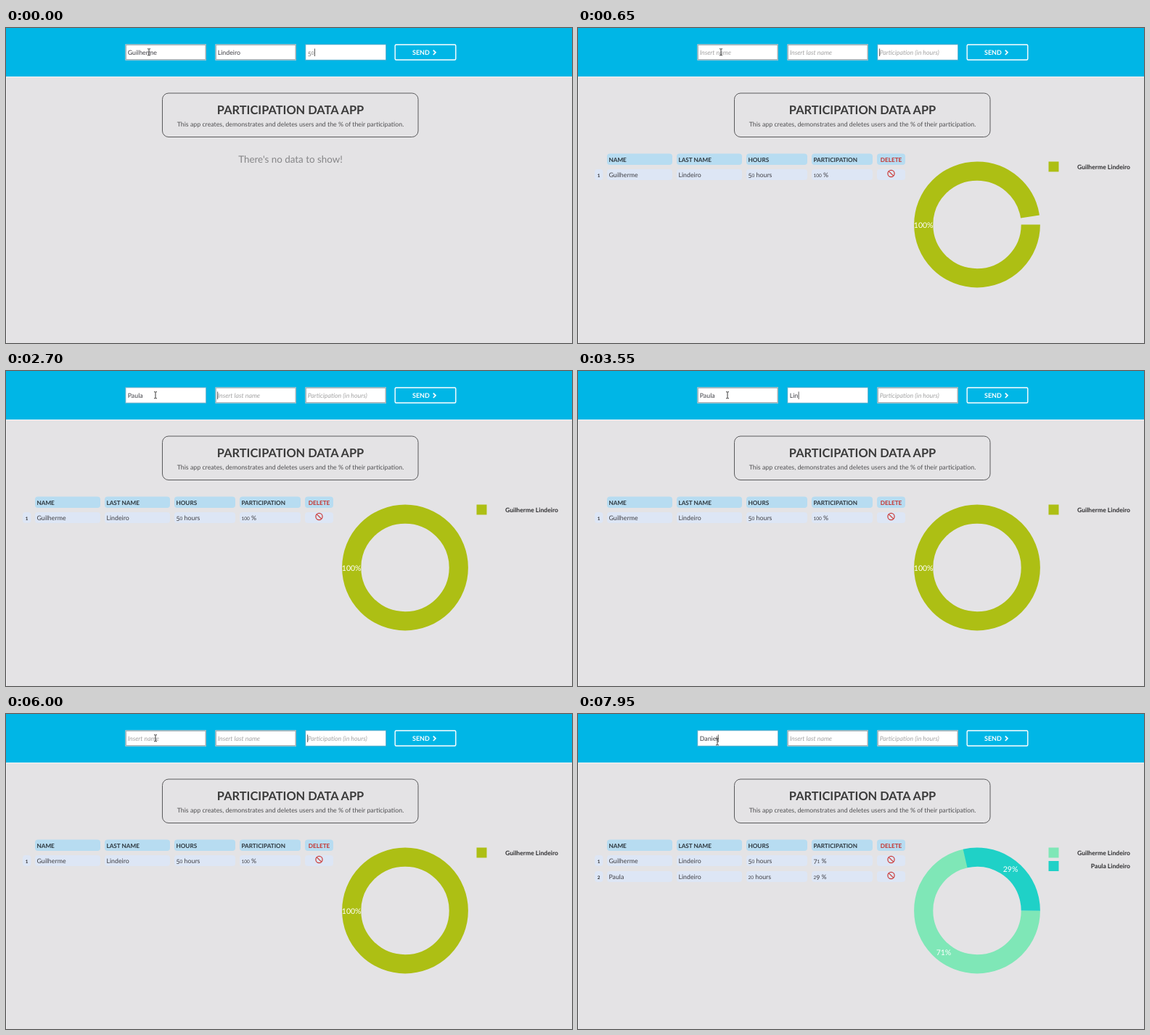
An HTML page that plays this animation: 780 px wide and 435 px high, repeating every 8000 ms.

```html
<!DOCTYPE html>
<html lang="en">
<head>
<meta charset="utf-8">
<title>Participation data app</title>
<style>
  html, body { margin: 0; width: 100%; height: 100%; overflow: hidden; background: #e4e3e5; }
  svg { display: block; width: 780px; height: 435px; }
  text { font: 8.8px Lato, "Open Sans", sans-serif; fill: #3e3e44; text-rendering: geometricPrecision; white-space: pre; }
  .title { font-size: 16.4px; font-weight: 700; fill: #3a3a3a; }
  .empty { font-size: 13.4px; fill: #858587; }
  .sub { fill: #505052; }
  .send { font-size: 9px; font-weight: 700; fill: #fff; }
  .head { font-size: 8.2px; font-weight: 700; fill: #2c353c; }
  .red { fill: #c5322d; }
  .bold { font-size: 8.6px; font-weight: 700; fill: #2e2e30; }
  .share { font-size: 10.5px; fill: #fff; }
  .hint { font-style: italic; fill: #a3a3a3; }
  .mid { text-anchor: middle; }
  .end { text-anchor: end; }
</style>
</head>
<body>
<svg id="stage" viewBox="0 0 780 435"></svg>
<script>
const LOOP = 8000;
const FIRST = "Guilherme", SECOND = "Paula", THIRD = "Daniel", FAMILY = "Lindeiro";
const TABLE_ONE = 200, TABLE_TWO = 6050;

const stage = document.getElementById("stage");
const el = id => document.getElementById(id);
const rect = (x, y, w, h, fill, extra = "") =>
  `<rect x="${x}" y="${y}" width="${w}" height="${h}" fill="${fill}" ${extra}/>`;
const label = (x, y, str, cls = "") => `<text x="${x}" y="${y}" class="${cls}">${str}</text>`;

// Digits with old-style heights: 0-2 small, the others hang below the line.
function oldStyle(str) {
  let low = 0;
  return [...str].map(c => {
    const drop = /[34579]/.test(c) ? 1.6 : 0;
    const dy = drop - low;
    low = drop;
    const size = /[012]/.test(c) ? ' font-size=".74em"' : "";
    return `<tspan dy="${dy}"${size}>${c}</tspan>`;
  }).join("");
}

// ---- timeline ----
const keys = (word, times) =>
  times.map((t, i) => [t, word.slice(0, Math.round((i + 1) * word.length / times.length))]);

const values = [
  [[0, FIRST], [100, ""], ...keys(SECOND, [1950, 2050, 2150, 2250, 2350]),
   [5900, ""], [7400, THIRD[0]], [7650, THIRD.slice(0, 2)], [7750, THIRD.slice(0, 3)],
   [7850, THIRD.slice(0, 5)], [7950, THIRD]],
  [[0, FAMILY], [100, ""], ...keys(FAMILY, [3100, 3350, 3550, 3750, 4000, 4250, 4350, 4450]), [5900, ""]],
  [[0, "50"], [100, ""], [5200, "2"], [5700, "20"], [5900, ""]]
];
const focus = [[0, 2], [1000, 0], [2600, 1], [4700, 2], [6900, 0]];
const moves = [[1000, 1500, 9, 0], [6850, 7350, -14, 5]];
const beats = [...values.flat(), ...focus].map(e => e[0]).concat(TABLE_ONE, TABLE_TWO);

const indexAt = (list, t) => list.reduce((n, e, i) => e[0] <= t ? i : n, 0);
const clamp = v => Math.max(0, Math.min(1, v));
const smooth = v => v * v * (3 - 2 * v);

// cubic-bezier(0, 0, .58, 1)
function easeOut(x) {
  let a = 0, b = 1;
  for (let i = 0; i < 24; i++) {
    const m = (a + b) / 2;
    if (1.74 * m * m - 0.74 * m * m * m < x) a = m; else b = m;
  }
  return smooth(b);
}

// ---- form ----
const hints = ["Insert name", "Insert last name", "Participation (in hours)"];
const fieldX = i => 164.5 + i * 124;

const field = i => {
  const x = fieldX(i);
  return rect(x, 22.5, 111.5, 22, "#fff") +
    rect(x + 0.75, 23.25, 110, 20.5, "none", `id="edge${i}" stroke="#a3b0b5" stroke-width="1.5"`) +
    rect(x + 0.25, 22.75, 111, 21.5, "none", `id="ring${i}" stroke="#2f9dc4" stroke-width=".9"`) +
    `<text id="hint${i}" class="hint" x="${x + 3.2}" y="37">${hints[i]}</text>
     <text id="value${i}" x="${x + 3.2}" y="37"${i === 2 ? ' style="fill:#777"' : ""}></text>`;
};

// ---- table and chart ----
const columns = [[40, 90, "NAME"], [136, 90, "LAST NAME"], [232, 84, "HOURS"], [322, 84, "PARTICIPATION"]];
const CX = 550, CY = 271.5, RADIUS = 73.8, TURN = 2 * Math.PI * RADIUS;

const header = columns.map(([x, w, name]) =>
  rect(x, 173.5, w, 15.5, "#b7dcf1", 'rx="4"') + label(x + 2.4, 184.5, name, "head")).join("") +
  rect(412, 173.5, 39, 15.5, "#b7dcf1", 'rx="4"') + label(431.5, 184.5, "DELETE", "head red mid");

function row(n, cells) {
  const y = 195 + n * 22;
  return rect(23, y, 11.5, 15, "#dde6f5", 'rx="4"') +
    label(28.7, y + 10.6, oldStyle(String(n + 1)), "bold mid") +
    columns.map(([x, w], i) =>
      rect(x, y, w, 15, "#dde6f5", 'rx="4"') + label(x + 2.4, y + 10.6, oldStyle(cells[i]))).join("") +
    rect(412, y, 39, 15, "#dde6f5", 'rx="4"') +
    `<g transform="translate(431.5 ${y + 6})" fill="none" stroke="#cb3a37" stroke-width="1.2">
      <circle r="4.6"/><path d="M-3.2-3.2 3.2 3.2"/></g>`;
}

function slice(from, part, color, id = "") {
  return `<circle ${id} cx="${CX}" cy="${CY}" r="${RADIUS}" fill="none" stroke="${color}" stroke-width="26.2"
    stroke-dasharray="${part * TURN} ${TURN}" transform="rotate(${from * 360} ${CX} ${CY})"/>`;
}

function share(from, part) {
  const a = (from + part / 2) * 2 * Math.PI;
  return label(CX + RADIUS * Math.cos(a), CY + RADIUS * Math.sin(a) + 4, Math.round(part * 100) + "%", "share mid");
}

const legend = (n, color, name) =>
  rect(648.5, 184.5 + n * 18.5, 14, 14, color) + label(761, 194.7 + n * 18.7, name, "bold end");

const OLIVE = "#adbf14", MINT = "#7fe7b7", TEAL = "#1fd1c7", PART = 5 / 7;
const people = [`${FIRST} ${FAMILY}`, `${SECOND} ${FAMILY}`];

const one = header + row(0, [FIRST, FAMILY, "50 hours", "100 %"]) +
  slice(0, 1, OLIVE, 'id="whole"') + share(0, 1) + legend(0, OLIVE, people[0]);

const two = header + row(0, [FIRST, FAMILY, "50 hours", "71 %"]) + row(1, [SECOND, FAMILY, "20 hours", "29 %"]) +
  slice(0, PART, MINT) + slice(PART, 1 - PART, TEAL) + share(0, PART) + share(PART, 1 - PART) +
  legend(0, MINT, people[0]) + legend(1, TEAL, people[1]);

stage.innerHTML =
  rect(0, 0, 780, 435, "#e4e3e5") + rect(0, 67, 1, 368, "#f0f0f1") +
  rect(0, 0, 780, 67, "#00b6e6") + rect(0, 67, 780, 1, "#f3f6f7") +
  [0, 1, 2].map(field).join("") +
  rect(536.2, 23, 83.6, 21, "none", 'rx="1.5" stroke="#fff" stroke-width="1.4"') +
  label(560, 37, "SEND", "send") +
  `<path d="M588.8 30.6 592 33.8 588.8 37" fill="none" stroke="#fff" stroke-width="1.7"/>` +
  rect(215.5, 90, 352.5, 60.5, "none", 'rx="8.5" stroke="#5a5a5c"') +
  label(392, 118.5, "PARTICIPATION DATA APP", "title mid") +
  label(392, 136.4, "This app creates, demonstrates and deletes users and the % of their participation.", "sub mid") +
  `<g id="none">${label(392, 186, "There's no data to show!", "empty mid")}</g>
   <g id="one">${one}</g><g id="two">${two}</g>
   <rect id="caret" y="28.5" width=".8" height="10.5" fill="#333"/>
   <path id="pointer" d="M-2-4.5H-.5L0-4 .5-4.5H2M0-4V4M-2 4.5H-.5L0 4 .5 4.5H2" fill="none" stroke="#222" stroke-width=".9"/>`;

const show = (id, on) => el(id).style.display = on ? "" : "none";

function draw(t) {
  const f = indexAt(focus, t);
  const active = focus[f][1];
  const before = f ? focus[f - 1][1] : active;
  const blend = f ? smooth(clamp((t - focus[f][0]) / 400)) : 1;

  values.forEach((list, i) => {
    const str = list[indexAt(list, t)][1];
    const box = el("value" + i);
    if (box.textContent !== str) box.innerHTML = oldStyle(str);
    show("hint" + i, !str);
    const lit = i === active ? blend : i === before ? 1 - blend : 0;
    el("edge" + i).setAttribute("opacity", 1 - lit);
    el("ring" + i).setAttribute("opacity", lit);
  });

  const last = Math.max(...beats.filter(b => b <= t));
  const text = el("value" + active);
  const width = text.textContent ? text.getComputedTextLength() + 0.4 : -0.4;
  el("caret").setAttribute("x", fieldX(active) + 3.2 + width);
  show("caret", (t - last) % 1000 < 500);

  let x = 197, y = 33.3;
  for (const [start, end, dx, dy] of moves) {
    const p = smooth(clamp((t - start) / (end - start)));
    x += dx * p;
    y += dy * p;
  }
  el("pointer").setAttribute("transform", `translate(${x} ${y})`);

  show("none", t < TABLE_ONE);
  show("one", t >= TABLE_ONE && t < TABLE_TWO);
  show("two", t >= TABLE_TWO);
  const sweep = easeOut(clamp((t - TABLE_ONE) / 515));
  el("whole").setAttribute("stroke-dasharray", sweep < 1 ? `${sweep * TURN} ${TURN}` : "none");
}

const begin = performance.now();
function tick() {
  draw((performance.now() - begin) % LOOP);
  requestAnimationFrame(tick);
}
tick();
</script>
</body>
</html>
```
